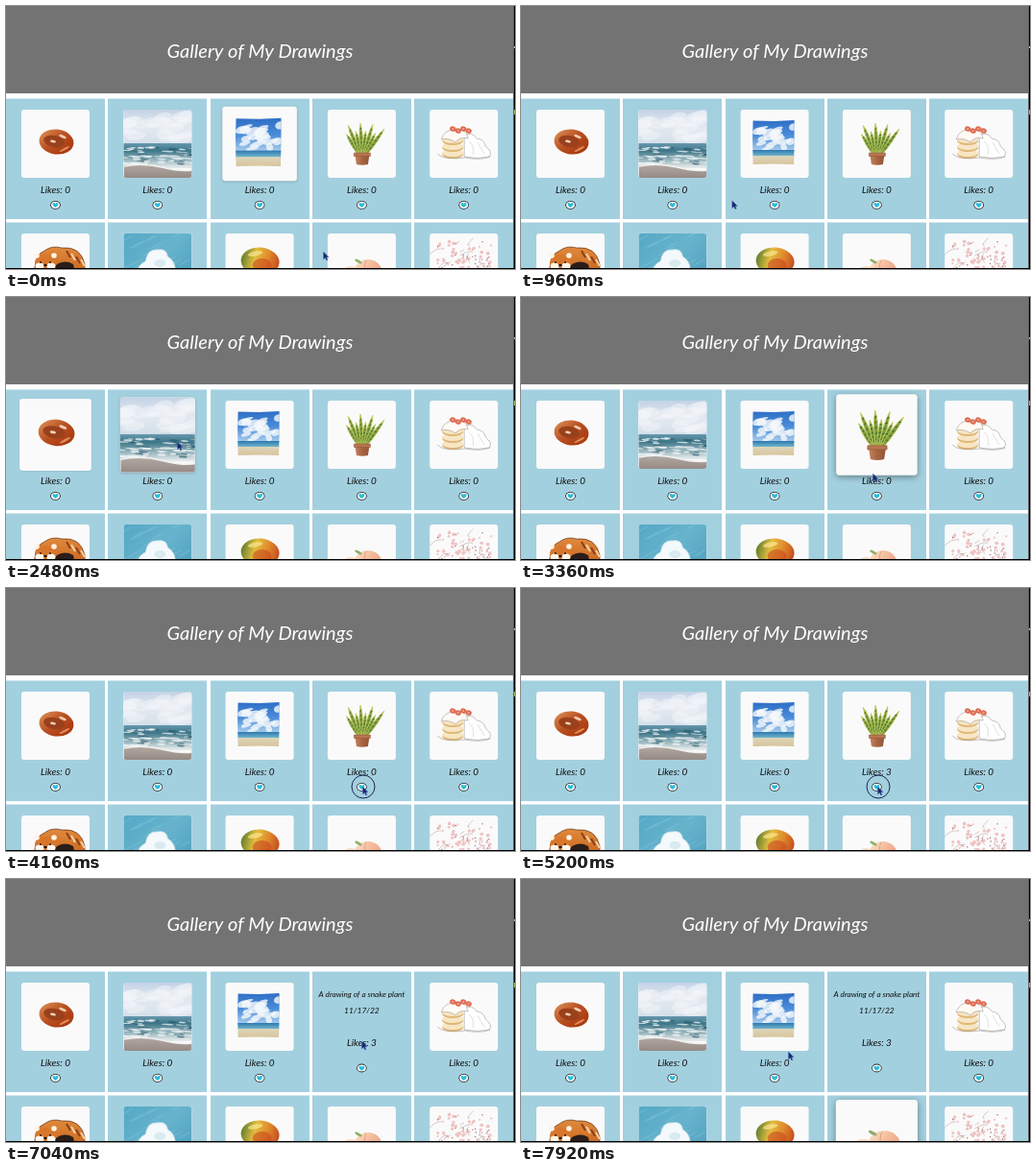
Recreate the animation shown at these times as an HTML page with a canvas. Size 530 px wide and 274 px high, loop 8 s.

```html
<!DOCTYPE html>
<html lang="en">
<head>
<meta charset="utf-8">
<title>Gallery</title>
<style>
  html, body { margin: 0; width: 100%; height: 100%; overflow: hidden; background: #fff; }
  canvas { display: block; width: 530px; height: 274px; }
</style>
</head>
<body>
<canvas id="stage" width="530" height="274"></canvas>
<script>
const ctx = document.getElementById('stage').getContext('2d');
const LOOP = 8000, STEP = 80, FADE = 400, TAU = Math.PI * 2;
const PITCH = 106.3, ROW = 129, SIZE = 71, GROW = 0.2;
const LIKE_AT = 4160, LIKE_GAP = 480, FLIP_AT = 6640, FLIPPED = 3;

// pointer stops: time, x, y
const STOPS = [
  [-600, 264, 150], [-130, 280, 184], [0, 332, 260], [400, 310, 230],
  [1000, 215, 205], [1760, 134, 155], [2250, 68, 148], [2480, 180, 155],
  [2950, 360, 160], [3360, 368, 188], [4160, 373, 211], [5300, 373, 211],
  [6240, 372, 156], [6900, 372, 154], [7900, 372, 290]
];

const clamp = v => Math.max(0, Math.min(1, v));
const mix = (a, b, p) => a + (b - a) * p;
const ease = p => {               // the CSS "ease" curve
  p = clamp(p);
  let lo = 0, hi = 1, s = 0.5;
  for (let i = 0; i < 16; i++) {
    s = (lo + hi) / 2;
    const x = 0.75 * s * (1 - s) ** 2 + 0.75 * s * s * (1 - s) + s ** 3;
    if (x < p) lo = s; else hi = s;
  }
  return 0.3 * s * (1 - s) ** 2 + 3 * s * s * (1 - s) + s ** 3;
};
const rng = seed => (a = 0, b = 1) => {
  seed = (seed * 16807) % 2147483647;
  return mix(a, b, seed / 2147483647);
};
const center = i => [51.5 + (i % 5) * PITCH, 143.5 + Math.floor(i / 5) * ROW];

function pointerAt(t) {
  const k = Math.max(1, STOPS.findIndex(s => s[0] >= t));
  const [t0, x0, y0] = STOPS[k - 1], [t1, x1, y1] = STOPS[k];
  const p = clamp((t - t0) / (t1 - t0));
  return [mix(x0, x1, p), mix(y0, y1, p)];
}

// Follow the pointer once and note when it enters and leaves each picture.
function findHovers(i) {
  const [cx, cy] = center(i), spans = [];
  let span = null;
  for (let t = STOPS[0][0]; t < 7900; t += 5) {
    const [x, y] = pointerAt(t);
    const reach = SIZE / 2 * (span ? 1 + GROW * ease((t - span.from) / FADE) : 1);
    const inside = Math.max(Math.abs(x - cx), Math.abs(y - cy)) < reach;
    if (inside && !span) spans.push(span = { from: t, to: LOOP });
    if (!inside && span) { span.to = t; span = null; }
  }
  return spans;
}

function oval(color, x, y, rx, ry = rx, rot = 0) {
  ctx.fillStyle = color;
  ctx.beginPath();
  ctx.ellipse(x, y, rx, ry, rot, 0, TAU);
  ctx.fill();
}
function rect(color, x, y, w, h) {
  ctx.fillStyle = color;
  ctx.fillRect(x, y, w, h);
}
function shape(d, fill, stroke, width = 0.6) {
  const p = new Path2D(d);
  if (fill) { ctx.fillStyle = fill; ctx.fill(p); }
  if (stroke) { ctx.strokeStyle = stroke; ctx.lineWidth = width; ctx.stroke(p); }
}
function fade(x0, y0, x1, y1, ...colors) {
  const g = ctx.createLinearGradient(x0, y0, x1, y1);
  colors.forEach((c, i) => g.addColorStop(i / (colors.length - 1), c));
  return g;
}
function text(str, x, y, size, color = '#111') {
  ctx.font = `italic ${size}px Lato, "Open Sans", sans-serif`;
  ctx.textAlign = 'center';
  ctx.fillStyle = color;
  ctx.fillText(str, x, y);
}

function bagel() {
  oval(fade(24, 20, 46, 47, '#d98a52', '#b84f20', '#a8380f'), 36.5, 33.5, 18, 13, 0.12);
  oval('#99401c', 34, 33, 11, 6, 0.2);
  oval('#f3d3b4', 33, 33, 3, 1.4, 0.2);
  oval('rgba(255,235,215,.8)', 43, 28, 4, 1.4, 0.4);
  oval('rgba(255,190,140,.6)', 45, 41, 6, 1.2, -0.5);
}

function seascape() {
  const r = rng(41);
  rect(fade(0, 0, 0, 36, '#c3d3e6', '#e3e9f0', '#d3dfe9'), 0, 0, SIZE, 36);
  for (let i = 0; i < 22; i++) oval('rgba(244,246,249,.5)', r(0, 72), r(6, 30), r(7, 15), r(2, 6), -0.15);
  rect(fade(0, 34, 0, 60, '#6d9db5', '#3d7688', '#8fb0b8', '#e4e9ea'), 0, 35, SIZE, 26);
  for (let i = 0; i < 60; i++) {
    oval(i % 4 ? 'rgba(240,245,246,.75)' : 'rgba(36,84,104,.6)', r(0, 72), r(39, 57), r(2, 7), r(0.4, 1.2), 0.06);
  }
  shape('M0 59Q20 55 40 60T72 63V72H0Z', fade(0, 57, 0, 72, '#b3a8a2', '#948883'), '#f0f1f0', 1.4);
}

function beach() {
  const r = rng(15);
  ctx.save();
  ctx.clip(new Path2D('M13 11.5L35 12L56 11V34L55.5 57L34 56.5L13 57L12.5 30Z'));
  rect(fade(0, 11, 0, 43, '#2f6fc6', '#4a8cd8', '#a9cdec'), 12, 10, 45, 34);
  for (let i = 0; i < 18; i++) {
    const y = r(18, 40);
    oval('rgba(246,249,252,.8)', r(18, 56), y, r(3, 8), r(1.5, 4), -0.3);
  }
  rect(fade(0, 42, 0, 49, '#2c78b0', '#7dbfcf'), 12, 42, 45, 7);
  rect(fade(0, 48, 0, 57, '#dcd6ba', '#d8c49c'), 12, 48, 45, 9);
  ctx.restore();
}

function plant() {
  const n = 8;
  for (let i = 0; i < n; i++) {
    const a = mix(-0.55, 0.62, i / (n - 1)), len = i % 2 ? 32 : 24;
    const dx = Math.sin(a), dy = -Math.cos(a), bx = 36 + a * 7;
    const at = (p, w) => `${bx + dx * len * p - dy * w} ${46 + dy * len * p + dx * w}`;
    shape(`M${at(0, -1)}Q${at(0.6, -3)} ${at(1, 0)}Q${at(0.6, 3)} ${at(0, 1)}Z`, '#7c9c3c', '#c6cb62', 0.8);
    for (let p = 0.2; p < 0.9; p += 0.15) shape(`M${at(p, -1)}L${at(p + 0.04, 1)}`, null, '#3f6a2b', 0.9);
  }
  shape('M28.5 47H43.5L42 57Q36 58.5 30 57Z', fade(28, 0, 44, 0, '#c48561', '#a8643f', '#8f5438'));
  shape('M27.5 45H44.5V48.5H27.5Z', '#b9744f', '#8f5339', 0.5);
}

function cake() {
  const line = '#8f8783';
  shape('M36 27Q44 22 49 30Q57 31 58 38Q66 44 62 49Q50 52 36 49Z', '#fefefe', line, 0.5);
  shape('M41 33Q47 38 45 47M50 34Q53 40 57 46', null, '#c9c3bf', 0.5);
  for (let y = 45; y > 30; y -= 7) oval('#dfb877', 24, y + 1.5, 11, 4.5), oval('#f7e6c4', 24, y, 11, 4);
  shape('M12 31Q15 21 25 21Q38 18 40 30Q31 28 27 34Q20 29 12 31Z', '#fffaf4', line, 0.5);
  for (let i = 0; i < 4; i++) {
    oval('#dd6a50', 24 + i * 5.5, 20 + (i % 2) * 2, 3.2, 2.6, 0.4);
    oval('#f6c0b0', 24 + i * 5.5, 20 + (i % 2) * 2, 1.2, 0.8);
  }
  shape('M8 46Q14 53 37 50Q53 53 63 49', null, line, 0.5);
}

function panda() {
  shape('M14 46Q12 22 24 18Q32 12 42 15Q62 13 66 32V50Z', fade(0, 14, 0, 42, '#e08a3c', '#c8651f'), '#4a2615');
  shape('M28 42Q40 24 54 32L57 46H28Z', '#2a1d1a');
  for (let i = 0; i < 4; i++) shape(`M${47 + i * 5} ${18 + i * 3}l4 7`, null, i % 2 ? '#f6d2a4' : '#8c3f1a', 2);
  oval('#d8772b', 25, 31, 11, 9, 0.1);
  for (const side of [-1, 1]) {
    oval('#fff4e6', 25 + side * 9, 23, 2.8);
    oval('#fff6ea', 25 + side * 6, 34, 4.5, 3.6);
    oval('#241815', 25 + side * 5, 30, 1);
  }
  oval('#241815', 25, 33, 1.8, 1.2);
}

function bear() {
  const r = rng(9);
  rect(fade(0, 0, 70, 60, '#55a8c6', '#67b3cc', '#4c9dbd'), 0, 0, SIZE, SIZE);
  for (let i = 0; i < 14; i++) oval('rgba(150,210,225,.22)', r(0, 72), r(0, 40), r(5, 14), 1, -0.5);
  shape('M12 46Q15 32 23 29Q25 16 35 17Q45 15 46 24Q53 28 54 37L58 46Z', '#f4f9fb', '#cfe5ed', 0.8);
  oval('#d9eaf1', 38, 31, 6, 4);
}

function mango() {
  oval(fade(17, 24, 56, 34, '#66802e', '#e2bd40', '#e08a2c', '#c4491f'), 36, 29, 20, 14.5, 0.1);
  oval('rgba(200,66,30,.55)', 38, 33, 10, 7);
  oval('rgba(255,236,150,.65)', 31, 21, 8, 2.5, -0.2);
}

function peach() {
  oval(fade(28, 27, 56, 46, '#fbe3cb', '#f4bd9c', '#ec9a80'), 42, 39, 14, 12);
  oval('#f8dcc2', 24, 40, 8, 6);
  shape('M40 28Q37 34 40 45', null, '#dd8f78', 0.7);
  oval('#8fae6a', 32, 29, 4, 1.4, 0.5);
}

function blossom() {
  const r = rng(77);
  for (let i = 0; i < 12; i++) {
    const x = r(12, 58), y = r(12, 44);
    shape(`M${x} ${y}q${r(-8, 8)} ${r(-4, 4)} ${r(-14, 14)} ${r(-10, 10)}`, null, '#b09490', 0.5);
  }
  for (let i = 0; i < 90; i++) {
    oval(i % 3 ? '#efc3c3' : '#b0696c', r(8, 64), r(8, 48), i % 3 ? r(1, 2) : 0.7);
  }
}

const ART = [bagel, seascape, beach, plant, cake, panda, bear, mango, peach, blossom];
const HOVERS = ART.map((_, i) => findHovers(i));

const hoverAmount = (i, t) => HOVERS[i].reduce((m, s) =>
  Math.max(m, ease((t - s.from) / FADE) * (1 - ease((t - s.to) / FADE))), 0);

function picture(i, t) {
  const h = hoverAmount(i, t), s = 1 + GROW * h;
  ctx.save();
  ctx.translate(...center(i));
  ctx.scale(s, s);
  ctx.translate(-SIZE / 2, -SIZE / 2);
  ctx.beginPath();
  ctx.roundRect(0, 0, SIZE, SIZE, 3);
  ctx.save();
  ctx.shadowColor = `rgba(0,0,0,${0.4 * h})`;
  ctx.shadowBlur = 7 * h;
  ctx.shadowOffsetY = 2 * h;
  ctx.fillStyle = '#fafafa';
  ctx.fill();
  ctx.restore();
  ctx.clip();
  ART[i]();
  ctx.restore();
}

function heart(x, y) {
  oval('#222', x, y, 5.3, 4.4);
  oval('#fff', x, y, 4.5, 3.6);
  shape(`M${x} ${y + 2.8}C${x - 5.5} ${y - 1} ${x - 2} ${y - 4} ${x} ${y - 1.3}C${x + 2} ${y - 4} ${x + 5.5} ${y - 1} ${x} ${y + 2.8}Z`, '#2bbcdc');
}

function card(i, t) {
  const [cx, cy] = center(i), top = cy - 47;
  rect('#a3d0df', Math.round(cx - 51.5), top, 103, 125.5);
  const likes = i === FLIPPED ? Math.max(0, Math.min(3, Math.ceil((t - LIKE_AT) / LIKE_GAP))) : 0;
  const flipped = i === FLIPPED && t > FLIP_AT;
  const base = flipped ? top + 77.5 : top + 98;
  text('Likes: ' + likes, cx, base, 10);
  heart(cx, flipped ? top + 100.5 : top + 110.8);
  if (flipped) {
    text('A drawing of a snake plant', cx, top + 26.5, 8.2);
    text('11/17/22', cx, top + 43.5, 8.5);
  } else picture(i, t);
}

function pointer(t) {
  const [x, y] = pointerAt(t);
  const clicks = [0, 1, 2].map(k => LIKE_AT + k * LIKE_GAP).concat(FLIP_AT);
  if (clicks.some(c => t >= c - 80 && t < c + 160)) {
    ctx.strokeStyle = '#1c2450';
    ctx.lineWidth = 1;
    ctx.beginPath();
    ctx.arc(x - 1, y - 4, 12, 0, TAU);
    ctx.stroke();
  }
  ctx.save();
  ctx.translate(x - 1.5, y - 4);
  shape('M0 0V8L1.9 6.3L3.2 9L4.5 8.4L3.2 5.8H5.6Z', '#17246e', '#5475bd', 0.4);
  ctx.restore();
}

function draw(t) {
  rect('#fff', 0, 0, 530, 274);
  rect('#737373', 0, 0, 528, 91);
  text('Gallery of My Drawings', 264.5, 54, 20, '#fff');
  ART.forEach((_, i) => card(i, t));
  rect('#000', 528.4, 0, 2, 274);
  rect('#bbb', 529, 42, 1, 2);
  rect('#a9b45a', 529, 108, 1, 5);
  rect('#000', 0, 273, 530, 1);
  pointer(t);
}

function frame(now) {
  draw(Math.floor((now % LOOP) / STEP) * STEP);
  requestAnimationFrame(frame);
}
requestAnimationFrame(frame);
</script>
</body>
</html>
```
